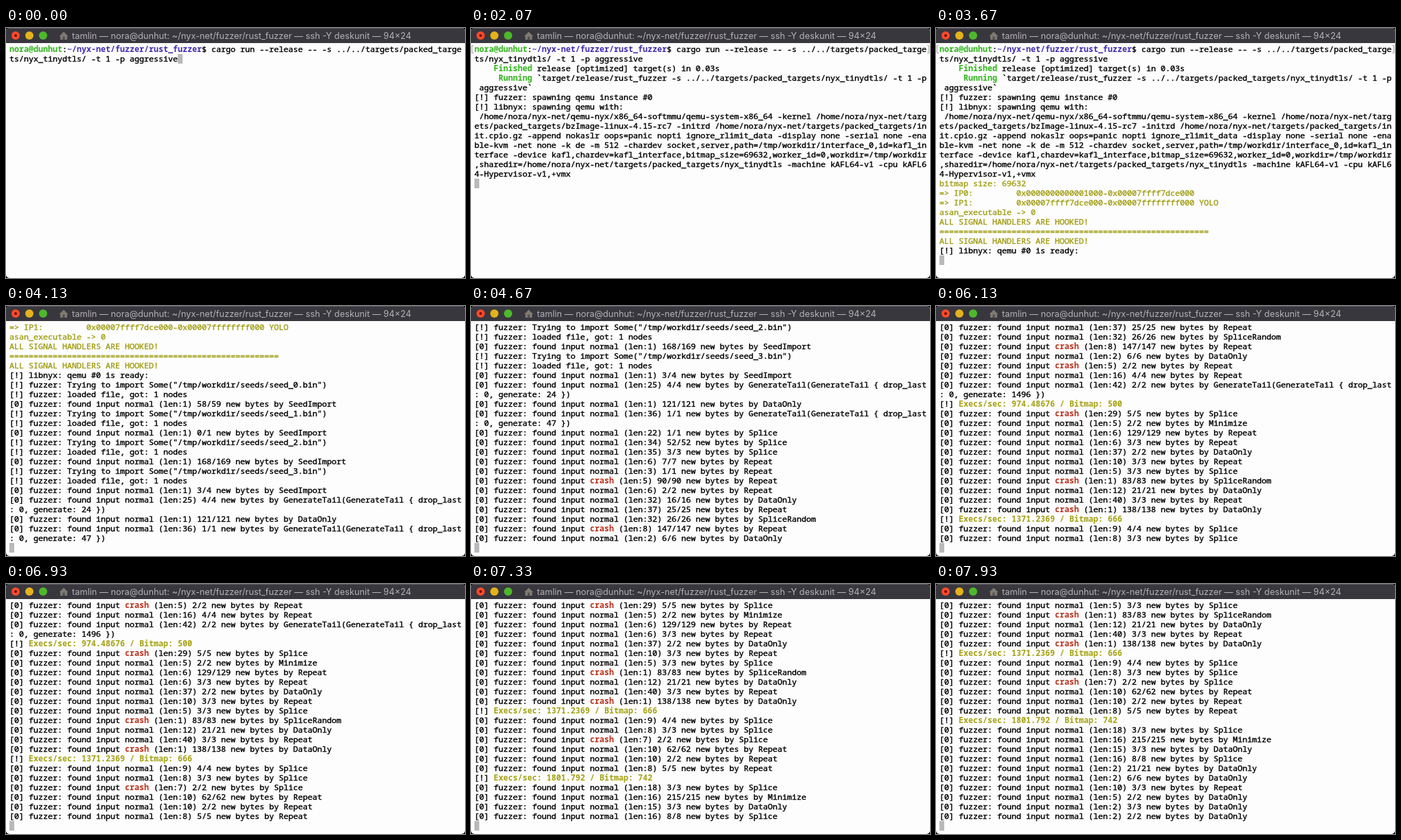
An HTML page with a canvas that plays this animation: 668x365 px, repeating every 8000 ms.

```html
<!DOCTYPE html>
<html lang="en">
<head>
<meta charset="utf-8">
<title>Fuzzer terminal</title>
<style>
html, body { margin: 0; width: 100%; height: 100%; overflow: hidden; background: #000; }
canvas { display: block; }
</style>
</head>
<body>
<canvas id="stage" width="668" height="365"></canvas>
<script>
const ctx = document.getElementById('stage').getContext('2d');
const W = 668, H = 365, LOOP = 8000;
const COLS = 94, ROWS = 24, CELL = 7, LINE = 14, LEFT = 5, TOP = 24;
const MONO = '11.667px "Noto Sans Mono", "DejaVu Sans Mono", monospace';
const SANS = '12.8px Inter, Roboto, sans-serif';

// "heft" is an outline that thickens the regular weight a little.
const INK = { color: '#000', weight: 500, heft: 0.4 };
const GREEN = { color: '#2fb41a', weight: 700, heft: 0 };
const BLUE = { color: '#3f2bb0', weight: 700, heft: 0 };
const RED = { color: '#b8301c', weight: 700, heft: 0 };
const OLIVE = { color: '#a09d14', weight: 500, heft: 0.4 };
const GOLD = { color: '#a5a214', weight: 700, heft: 0 };

const HOME = '/home/nora/nyx-net/';
const PACKED = 'targets/packed_targets/';
const ARGS = `-s ../../${PACKED}nyx_tinydtls/ -t 1 -p aggressive`;
const CWD = '~/nyx-net/fuzzer/rust_fuzzer';
const TITLE = `tamlin — nora@dunhut: ${CWD} — ssh -Y deskunit — 94×24`;
const QEMU = ` ${HOME}qemu-nyx/x86_64-softmmu/qemu-system-x86_64` +
  ` -kernel ${HOME}${PACKED}bzImage-linux-4.15-rc7 -initrd ${HOME}${PACKED}init.cpio.gz` +
  ' -append nokaslr oops=panic nopti ignore_rlimit_data -display none -serial none' +
  ' -enable-kvm -net none -k de -m 512' +
  ' -chardev socket,server,path=/tmp/workdir/interface_0,id=kafl_interface' +
  ' -device kafl,chardev=kafl_interface,bitmap_size=69632,worker_id=0,workdir=/tmp/workdir' +
  `,sharedir=${HOME}${PACKED}nyx_tinydtls -machine kAFL64-v1 -cpu kAFL64-Hypervisor-v1,+vmx`;
const MUTATORS = {
  I: 'SeedImport', D: 'DataOnly', S: 'Splice', X: 'SpliceRandom', R: 'Repeat', M: 'Minimize'
};

const log = [];

// Wraps styled runs into rows of cells.
function wrap(runs) {
  const rows = [[]];
  for (const [text, style] of runs) {
    for (const char of text) {
      if (rows[rows.length - 1].length === COLS) rows.push([]);
      rows[rows.length - 1].push({ char, style });
    }
  }
  return rows;
}

function print(time, ...runs) {
  log.push({ time, rows: wrap(runs) });
}

function spread(from, to, lines) {
  const gap = lines.length > 1 ? (to - from) / (lines.length - 1) : 0;
  lines.forEach((runs, i) => print(from + i * gap, ...runs));
}

const ink = text => [[text, INK]];
const olive = text => [[text, OLIVE]];

// "!5 90/90 R" is a crash; "25 4/4 G24" a generated tail.
function find(code) {
  const [len, bytes, by] = code.split(' ');
  const crash = len[0] === '!';
  const name = MUTATORS[by] ||
    `GenerateTail(GenerateTail { drop_last: 0, generate: ${by.slice(1)} })`;
  return [
    ['[0] fuzzer: found input ', INK],
    crash ? ['crash', RED] : ['normal', INK],
    [` (len:${len.replace('!', '')}) ${bytes} new bytes by ${name}`, INK]
  ];
}

const finds = codes => codes.split(', ').map(find);

const seed = (n, bytes) => [
  ink(`[!] fuzzer: Trying to import Some("/tmp/workdir/seeds/seed_${n}.bin")`),
  ink('[!] fuzzer: loaded file, got: 1 nodes'),
  find(`1 ${bytes} I`)
];

const stats = (time, rate, bitmap) =>
  print(time, ['[!] ', INK], [`Execs/sec: ${rate} / Bitmap: ${bitmap}`, GOLD]);

print(0, ['nora@dunhut', GREEN], [':', INK], [CWD, BLUE], [`$ cargo run --release -- ${ARGS}`, INK]);
print(735, ['    Finished', GREEN], [' release [optimized] target(s) in 0.03s', INK]);
print(735, ['     Running', GREEN], [` \`target/release/rust_fuzzer ${ARGS}\``, INK]);
spread(930, 1000, [
  '[!] fuzzer: spawning qemu instance #0', '[!] libnyx: spawning qemu with:', QEMU
].map(ink));

const HOOKED = 'ALL SIGNAL HANDLERS ARE HOOKED!';
spread(2670, 3060, [
  'bitmap size: 69632',
  '=> IP0:         0x0000000000001000-0x00007ffff7dce000',
  '=> IP1:         0x00007ffff7dce000-0x00007ffffffff000 YOLO',
  'asan_executable -> 0', HOOKED, '='.repeat(56), HOOKED
].map(olive));

spread(3670, 4115, [
  ink('[!] libnyx: qemu #0 is ready:'),
  ...seed(0, '58/59'), ...seed(1, '0/1'), ...seed(2, '168/169'), ...seed(3, '3/4'),
  ...finds('25 4/4 G24, 1 121/121 D, 36 1/1 G47')
]);
spread(4180, 4650, finds('22 1/1 S, 34 52/52 S, 35 3/3 S, 6 7/7 R, 3 1/1 R, !5 90/90 R, ' +
  '6 2/2 R, 32 16/16 D, 37 25/25 R, 32 26/26 X, !8 147/147 R, 2 6/6 D'));
spread(4730, 4900, finds('!5 2/2 R, 16 4/4 R, 42 2/2 G1496'));
stats(4980, '974.48676', 500);
spread(5060, 5900, finds('!29 5/5 S, 5 2/2 M, 6 129/129 R, 6 3/3 R, 37 2/2 D, 10 3/3 R, ' +
  '5 3/3 S, !1 83/83 X, 12 21/21 D, 40 3/3 R, !1 138/138 D'));
stats(5980, '1371.2369', 666);
spread(6050, 6115, finds('9 4/4 S, 8 3/3 S'));
spread(6270, 6870, finds('!7 2/2 S, 10 62/62 R, 10 2/2 R, 8 5/5 R'));
stats(6980, '1801.792', 742);
spread(7060, 7310, finds('18 3/3 S, 16 215/215 M, 15 3/3 D, 16 8/8 S'));
spread(7400, 7910, finds('2 21/21 D, 2 6/6 D, 10 3/3 R, 5 2/2 D, 2 3/3 D, 2 2/2 D'));

const ENTER = 670;

function disc(x, y, r, color) {
  ctx.fillStyle = color;
  ctx.beginPath();
  ctx.arc(x, y, r, 0, Math.PI * 2);
  ctx.fill();
}

function drawHouse() {
  ctx.fillStyle = '#7f7a72';
  ctx.beginPath();
  ctx.moveTo(77.5, 12);
  ctx.lineTo(84, 5.5);
  ctx.lineTo(90.5, 12);
  ctx.lineTo(89, 12);
  ctx.lineTo(89, 17);
  ctx.lineTo(79, 17);
  ctx.lineTo(79, 12);
  ctx.fill();
  ctx.fillStyle = '#55504c';
  ctx.fillRect(82.5, 12.5, 3, 4.5);
}

function drawFrame() {
  ctx.fillStyle = '#000';
  ctx.fillRect(0, 0, W, H);
  ctx.beginPath();
  ctx.roundRect(0, 0, W, H, 5);
  ctx.clip();
  ctx.fillStyle = '#fdfdfd';
  ctx.fillRect(0, 0, W, H);
  ctx.fillStyle = '#39373e';
  ctx.fillRect(0, 0, W, 22);
  ctx.fillStyle = '#5c5a60';
  ctx.fillRect(0, 0, W, 1);
  disc(14, 11, 6, '#ff4a2a');
  disc(14, 11, 2, '#6a0c00');
  disc(34, 11, 6, '#e3b21c');
  disc(54, 11, 6, '#4db82c');
  drawHouse();
  ctx.font = SANS;
  ctx.fillStyle = '#b3b2b4';
  ctx.fillText(TITLE, 96, 16);
}

// Edge brackets that mark an entered prompt line.
function drawMarks(y) {
  ctx.strokeStyle = '#a3a2a6';
  ctx.lineWidth = 1;
  ctx.beginPath();
  for (const [edge, tip] of [[1.5, 4], [666.5, 664]]) {
    ctx.moveTo(tip, y + 1.5);
    ctx.lineTo(edge, y + 1.5);
    ctx.lineTo(edge, y + 12.5);
    ctx.lineTo(tip, y + 12.5);
  }
  ctx.stroke();
}

function drawRow(cells, y) {
  let style = null;
  cells.forEach((cell, col) => {
    if (cell.char === ' ') return;
    if (cell.style !== style) {
      style = cell.style;
      ctx.font = `${style.weight} ${MONO}`;
      ctx.fillStyle = ctx.strokeStyle = style.color;
    }
    const x = LEFT + col * CELL;
    ctx.fillText(cell.char, x, y + 11);
    if (style.heft) {
      ctx.lineWidth = style.heft;
      ctx.strokeText(cell.char, x, y + 11);
    }
  });
}

function draw(t) {
  ctx.save();
  drawFrame();
  const rows = log.filter(entry => entry.time <= t).flatMap(entry => entry.rows);
  if (t >= ENTER) rows.push([]);
  const first = Math.max(0, rows.length - ROWS);
  const last = rows.length - 1;
  ctx.fillStyle = '#b9b8bb';
  ctx.fillRect(LEFT + rows[last].length * CELL, TOP + (last - first) * LINE, CELL, LINE);
  rows.slice(first).forEach((cells, i) => drawRow(cells, TOP + i * LINE));
  if (first === 0 && t >= ENTER) drawMarks(TOP);
  ctx.restore();
}

const start = performance.now();
function tick() {
  draw((performance.now() - start) % LOOP);
  requestAnimationFrame(tick);
}
tick();
</script>
</body>
</html>
```
